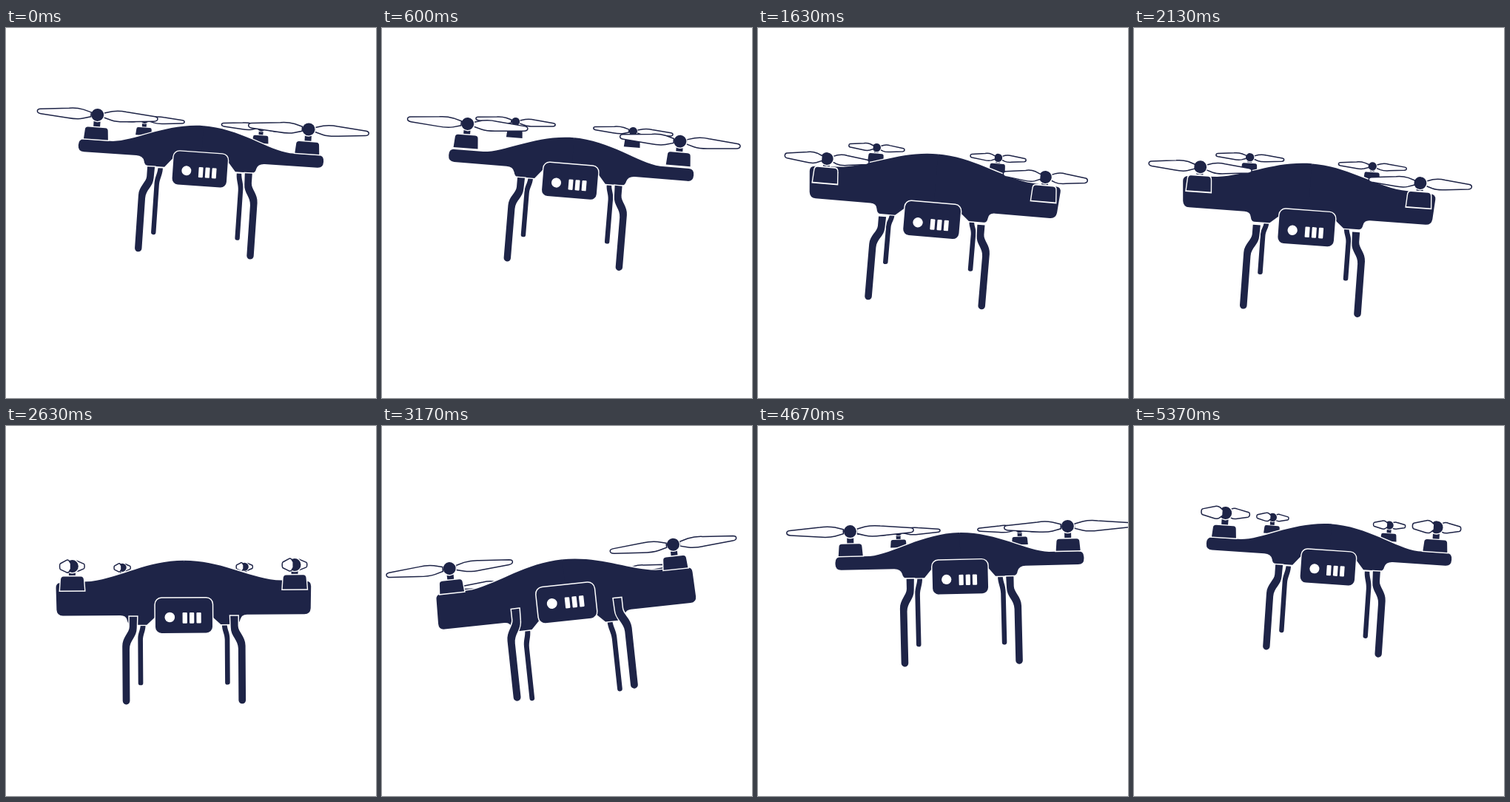
An HTML page without scripts that plays this animation: 500x500 px, repeating every 5410 ms.

```html
<!DOCTYPE html>
<html lang="en">
<head>
<meta charset="utf-8">
<title>Hovering drone</title>
<style>
@property --cx { syntax: "<number>"; inherits: true; initial-value: 262 }
@property --cy { syntax: "<number>"; inherits: true; initial-value: 191 }
@property --tilt { syntax: "<number>"; inherits: true; initial-value: 3.9 }
@property --fx { syntax: "<number>"; inherits: true; initial-value: 143 }
@property --fy { syntax: "<number>"; inherits: true; initial-value: -30 }
@property --box { syntax: "<number>"; inherits: true; initial-value: 1 }
@property --bx { syntax: "<number>"; inherits: true; initial-value: 79 }
@property --by { syntax: "<number>"; inherits: true; initial-value: -40 }
@property --ry { syntax: "<number>"; inherits: true; initial-value: 2 }
@property --rs { syntax: "<number>"; inherits: true; initial-value: 1 }
@property --lx { syntax: "<number>"; inherits: true; initial-value: 1 }
@property --ly { syntax: "<number>"; inherits: true; initial-value: 1 }
@property --cam { syntax: "<number>"; inherits: true; initial-value: 1 }
@property --eye { syntax: "<number>"; inherits: true; initial-value: 0 }
@property --span { syntax: "<number>"; inherits: true; initial-value: 1 }
@property --near { syntax: "<number>"; inherits: true; initial-value: 1 }

html, body { margin: 0; width: 100%; height: 100%; overflow: hidden; background: #fff }
svg { display: block; width: 100%; height: 100% }

.drone {
  fill: #1e2447; stroke: #fff; stroke-width: 2.8; paint-order: stroke;
  transform: translate(calc(var(--cx) * 1px), calc(var(--cy) * 1px)) rotate(calc(var(--tilt) * 1deg));
  animation: pose 5.41s infinite, spin calc(5.41s / 18) step-end -12ms infinite;
}
.hull { animation: hull 5.41s infinite }
.left { --side: -1 }
.right { --side: 1 }

.front { transform: translate(calc(var(--side) * var(--fx) * 1px), calc(var(--fy) * 1px)) }
.back { transform: translate(calc(var(--side) * var(--bx) * 1px), calc(var(--by) * 1px)) scale(.66) }
.box { transform: scaleY(var(--box)) }
.blade { fill: #fefdff; stroke: #1e2447; stroke-width: 1.5; paint-order: normal }
.far { transform: translateY(-34px) scaleX(var(--span)) }
.near { transform: translateY(-34px) scale(calc(-1 * var(--span)), var(--near)) }
.leg { transform: scale(calc(var(--side) * var(--lx)), var(--ly)) }
.rear { transform: translateY(calc(var(--ry) * 1px)) scale(calc(var(--side) * var(--lx)), var(--rs)) }
.cam { transform: scale(var(--cam)) }
.eye { fill: #fff; stroke: none; transform: translateY(calc(var(--eye) * 1px)) }

@keyframes pose {
  0%, 100% {
    --cx: 262; --cy: 191; --tilt: 3.9; --fx: 143; --fy: -30; --box: 1; --bx: 79; --by: -40;
    --ry: 2; --rs: 1; --lx: 1; --ly: 1; --cam: 1; --eye: 0;
    animation-timing-function: cubic-bezier(.45, .1, .75, .7);
  }
  21.63% {
    --cx: 239; --cy: 236; --tilt: 6.2; --fx: 146; --fy: -35; --box: 1.3; --bx: 81; --by: -73;
    --ry: -2; --rs: .67; --lx: 1; --ly: .965; --cam: 1.02; --eye: 2;
    animation-timing-function: cubic-bezier(.25, .4, .6, 1);
  }
  39.37% {
    --cx: 233; --cy: 270; --tilt: 4.2; --fx: 149; --fy: -37.5; --box: 1.28; --bx: 83; --by: -67;
    --ry: -3; --rs: .78; --lx: 1.02; --ly: .99; --cam: 1.03; --eye: 1.5;
    animation-timing-function: cubic-bezier(.35, 0, .7, 1);
  }
  58.6% {
    --cx: 249; --cy: 239; --tilt: -6.1; --fx: 152; --fy: -29; --box: 1.05; --bx: 82; --by: -13;
    --ry: 31; --rs: 1.06; --lx: 1.05; --ly: 1.07; --cam: 1.07; --eye: -4;
    animation-timing-function: linear;
  }
  71.53% {
    --cx: 266; --cy: 228; --tilt: -8.8; --fx: 151; --fy: -32; --box: 1; --bx: 84; --by: -32;
    --ry: 13; --rs: 1.045; --lx: 1.04; --ly: 1.05; --cam: 1.04; --eye: -3;
    animation-timing-function: linear;
  }
  86.32% {
    --cx: 273; --cy: 204; --tilt: -1.4; --fx: 147; --fy: -31; --box: 1; --bx: 82; --by: -41;
    --ry: 0; --rs: 1.03; --lx: 1.02; --ly: 1.025; --cam: 1.02; --eye: 0;
    animation-timing-function: cubic-bezier(.3, .4, .7, 1);
  }
}

/* right half of the body, drawn again mirrored */
@keyframes hull {
  0%, 100% {
    d: path("M-1,-59C50,-59 90,-32 120,-30H159Q166,-30 166,-22V-21Q166,-13 158,-13H87Q78,-13 76,-6Q75,0 70,0H48L37,-13H-1");
    animation-timing-function: cubic-bezier(.45, .1, .75, .7);
  }
  21.63% {
    d: path("M-1,-95C50,-95 90,-72 125,-65L162,-62Q168,-62 168,-56L165,-24Q164,-16 156,-16H83Q75,-16 74,-9Q73,-2 69,-2H50L37,-13H-1");
    animation-timing-function: cubic-bezier(.25, .4, .6, 1);
  }
  39.37% {
    d: path("M-1,-87C50,-87 82,-65 125,-60L164,-58Q171,-58 171,-51L169,-24Q168,-16 160,-16H85Q77,-16 76,-9Q75,-3 71,-3H50L37,-14H-1");
    animation-timing-function: cubic-bezier(.35, 0, .7, 1);
  }
  58.6% {
    d: path("M-1,-59C50,-59 85,-37 125,-31L167,-30Q174,-30 174,-23L175,10Q175,18 167,18H86Q79,18 77,24Q75,31 69,31H50L37,18H-1");
    animation-timing-function: linear;
  }
  71.53% {
    d: path("M-1,-63C50,-63 88,-38 122,-33L166,-32Q174,-32 174,-25L174,-10Q174,-2 166,-2H87Q79,-2 77,5Q75,13 69,13H50L37,0H-1");
    animation-timing-function: linear;
  }
  86.32% {
    d: path("M-1,-60C50,-60 90,-33 121,-31L160,-31Q168,-31 168,-23L168,-21Q168,-13 160,-13H89Q80,-13 78,-6Q77,0 72,0H48L37,-13H-1");
    animation-timing-function: cubic-bezier(.3, .4, .7, 1);
  }
}

@keyframes spin {
  0% { --span: .97; --near: 1 }
  11.11% { --span: .83; --near: 1 }
  22.22% { --span: .4; --near: 1.2 }
  33.33% { --span: .2; --near: 1.2 }
  44.44% { --span: .68; --near: 1.05 }
  55.55% { --span: 1.02; --near: 1 }
  66.66% { --span: .55; --near: 1.1 }
  77.77% { --span: .2; --near: 1.2 }
  88.88% { --span: .39; --near: 1.2 }
}
</style>
</head>
<body>
<svg viewBox="0 0 500 500">
  <defs>
    <path id="blade" vector-effect="non-scaling-stroke" d="M9,-3L20,-6Q30,-8 40,-6.500L80,-3Q84,-2.500 84,0Q84,3 79,3.500L42,6.500Q28,8 20,6L9,3Z"/>
    <path id="box" d="M-16.500,-1L-15.500,-13Q-15.500,-17 -11.500,-17H11.500Q15.500,-17 15.500,-13L16.500,-1Z"/>
    <path id="neck" d="M-4.500,-10V-30H4.500V-10Z"/>
    <circle id="hub" cy="-34" r="8.500"/>
    <path id="leg" d="M61,1H71V14C71,22 80.500,28 80.500,40V112a4.700,4.700 0 0 1 -9.400,0V44C71,32 61.500,28 61.500,16Z"/>
    <path id="rear" d="M50,0H56.500C57,9 60,12 60,21V87a3.200,3.200 0 0 1 -6.400,0V23C53.500,14 50,10 50,0Z"/>
  </defs>

  <g class="drone">
    <g class="back left">
      <use href="#neck"/><use href="#box" class="box"/>
      <use href="#blade" class="blade far"/><use href="#hub"/><use href="#blade" class="blade near"/>
    </g>
    <g class="back right">
      <use href="#neck"/><use href="#box" class="box"/>
      <use href="#blade" class="blade far"/><use href="#hub"/><use href="#blade" class="blade near"/>
    </g>

    <use href="#rear" class="rear left"/>
    <use href="#rear" class="rear right"/>

    <path class="hull"/>
    <path class="hull" transform="scale(-1,1)"/>

    <g class="cam">
      <rect x="-36.500" y="-22.500" width="73.500" height="45" rx="8"/>
      <g class="eye">
        <circle cx="-18" cy="3" r="6.500"/>
        <rect x="-1.500" y="-3" width="6" height="14" rx="1"/>
        <rect x="7.500" y="-3" width="6" height="14" rx="1"/>
        <rect x="16.500" y="-3" width="6" height="14" rx="1"/>
      </g>
    </g>

    <use href="#leg" class="leg left"/>
    <use href="#leg" class="leg right"/>

    <g class="front left">
      <use href="#neck"/><use href="#box" class="box"/>
      <use href="#blade" class="blade far"/><use href="#hub"/><use href="#blade" class="blade near"/>
    </g>
    <g class="front right">
      <use href="#neck"/><use href="#box" class="box"/>
      <use href="#blade" class="blade far"/><use href="#hub"/><use href="#blade" class="blade near"/>
    </g>
  </g>
</svg>
</body>
</html>
```
